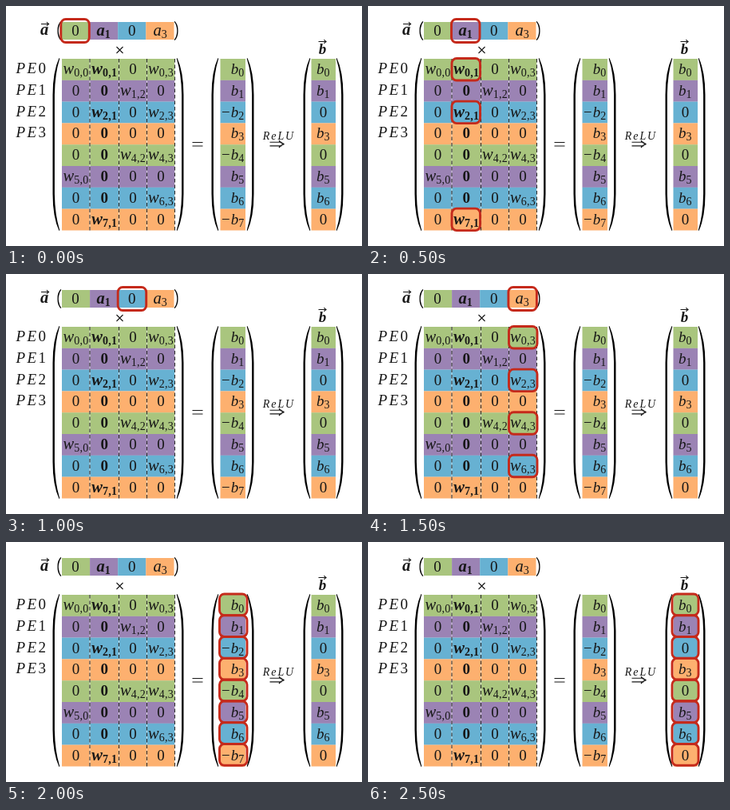
An HTML page for the animation above (3000 ms loop, 446x300 px).

```html
<!DOCTYPE html>
<html lang="en">
<head>
<meta charset="utf-8">
<title>Sparse matrix-vector product</title>
<style>
  html, body { margin: 0; width: 100%; height: 100%; overflow: hidden; background: #fff; }
  svg { display: block; width: 446px; height: 300px; }
  text { font: 19px "Liberation Serif", "Times New Roman", serif; fill: #171717; }
  .it { font-style: italic; }
  .bold { font-weight: bold; }
  .wide { font-size: 20.5px; }
  .sub { font-size: 14px; font-style: normal; letter-spacing: .3px; }
  .line { fill: none; stroke: #171717; stroke-width: 1.1; }
  .gap { stroke: #fff; stroke-width: 1; opacity: .6; }
  .dash { stroke: #303030; stroke-width: 1.1; stroke-dasharray: 4.5 3; }
  .mark { fill: none; stroke: #c52a1b; stroke-width: 2.9; visibility: hidden; animation: show 3s step-end infinite; }
  @keyframes show {
    0% { visibility: visible; }
    16.6667%, 100% { visibility: hidden; }
  }
</style>
</head>
<body>
<svg id="stage" viewBox="0 0 446 300"></svg>
<script>
const NS = "http://www.w3.org/2000/svg";
const stage = document.getElementById("stage");
const colors = ["#a9c57e", "#9b83b4", "#67b1d2", "#fdb06f"];
const LEFT = 70, TOP = 66, ROW = 26.8;
const edges = [LEFT, 105, 141.5, 176.5, 211.5];
const matrix = ["1101", "0010", "0101", "0000", "0011", "1000", "0001", "0100"];
const negative = [2, 4, 7];

function add(tag, attrs, parent = stage) {
  const el = document.createElementNS(NS, tag);
  for (const key in attrs) el.setAttribute(key, attrs[key]);
  parent.appendChild(el);
  return el;
}

function rect(x, y, width, height, fill) {
  add("rect", { x, y, width, height, fill });
}

function path(d, cls = "line") {
  add("path", { d, class: cls });
}

// Text with an optional subscript; single digits stay upright.
function label(x, y, main, sub = "", bold = false, anchor = "middle") {
  const cls = [main !== "0" && "it", bold && "bold", /^[wa]$/.test(main) && "wide"];
  const t = add("text", { x, y, "text-anchor": anchor, class: cls.filter(Boolean).join(" ") });
  t.textContent = main;
  if (sub) add("tspan", { dy: 3, class: "sub" }, t).textContent = sub;
  return t;
}

// Tapered parenthesis; dir is 1 for the left one and -1 for the right one.
function paren(x, top, bottom, dir, depth, thick, bend) {
  const tip = x + dir * depth, inner = x + dir * thick;
  const a = top + bend, b = bottom - bend;
  path(`M${tip} ${top}Q${x} ${top + bend * .38} ${x} ${a}V${b}` +
    `Q${x} ${bottom - bend * .38} ${tip} ${bottom}l${dir * .8} -.8` +
    `Q${inner + dir * .4} ${bottom - bend * .42} ${inner} ${b}V${a}` +
    `Q${inner + dir * .4} ${top + bend * .42} ${tip + dir * .8} ${top + .8}Z`, "");
}

function vecArrow(x, y) {
  path(`M${x - 5} ${y}h10m-3 -2.5q1 2 3 2.5q-2 .5 -3 2.5`);
}

function mark(step, x, y, width, height, rx = 6) {
  add("rect", {
    x, y, width, height, rx, class: "mark",
    style: `animation-delay:${step * .5 - 3}s`
  });
}

// Input vector
label(48, 36, "a", "", true);
vecArrow(49, 22.5);
paren(64.5, 19, 43, 1, 4, 1.3, 11);
paren(215.5, 19, 43, -1, 4, 1.3, 11);
["0", "a", "0", "a"].forEach((name, i) => {
  rect(LEFT + i * 35.1, 20, 35.2, 22, colors[i]);
  label(87 + i * 35.4, 36.5, name, name === "a" ? String(i) : "", i === 1);
});
path("M138.5 51l8 8m0 -8l-8 8");

// Matrix and result columns
matrix.forEach((bits, r) => {
  const y = TOP + r * ROW, base = y + 19, fill = colors[r % 4];
  rect(LEFT, y, edges[4] - LEFT, ROW + .1, fill);
  rect(268.5, y, 31.5, ROW + .1, fill);
  rect(382.5, y, 30.5, ROW + .1, fill);
  [...bits].forEach((bit, c) => {
    const x = (edges[c] + edges[c + 1]) / 2;
    if (bit === "1") label(x, base, "w", `${r},${c}`, c === 1);
    else label(x, base, "0", "", c === 1);
  });
  const minus = negative.includes(r);
  label(298.5, base, (minus ? "−" : "") + "b", String(r), false, "end");
  if (minus) label(397.5, base, "0");
  else label(397.5, base, "b", String(r));
  if (r < 4) {
    const t = label(12.5, base - 1, "PE", "", false, "start");
    t.style.letterSpacing = "2.4px";
    add("tspan", { style: "font-style:normal;letter-spacing:0" }, t).textContent = r;
  }
});
edges.slice(1).forEach(x => {
  path(`M${x} ${TOP}V281`, "gap");
  path(`M${x} ${TOP}V281`, "dash");
});
[[58.5, 222.5], [257.5, 310.5], [372.5, 422.5]].forEach(([l, r]) => {
  paren(l, 65, 281, 1, 8, 2.4, 46);
  paren(r, 65, 281, -1, 8, 2.4, 46);
});

// Operators
path("M233.5 170.5h13m-13 4.5h13");
const relu = label(342, 167, "ReLU");
relu.style.fontSize = "14px";
relu.style.letterSpacing = "1.9px";
path("M330.5 170.3h15m-15 4.6h15m-3.5 -6.8q2 3.4 6.5 4.5q-4.5 1.1 -6.5 4.5");
label(396.5, 59.5, "b", "", true);
vecArrow(396.5, 44.5);

// Highlights
const pick = (step, c, rows) => {
  mark(step, 68.8 + c * 35.7, 16.5, 35.5, 29);
  rows.forEach(r => mark(step, edges[c], TOP - .5 + r * ROW, 35.5, 27.5));
};
pick(0, 0, []);
pick(1, 1, [0, 2, 7]);
pick(2, 2, []);
pick(3, 3, [0, 2, 4, 6]);
for (let r = 0; r < 8; r++) {
  const y = TOP - 1 + r * ROW;
  mark(4, 267.5, y, 34.5, 26.6, 6);
  mark(5, 381, y, 33, 26.6, 6);
}
</script>
</body>
</html>
```
